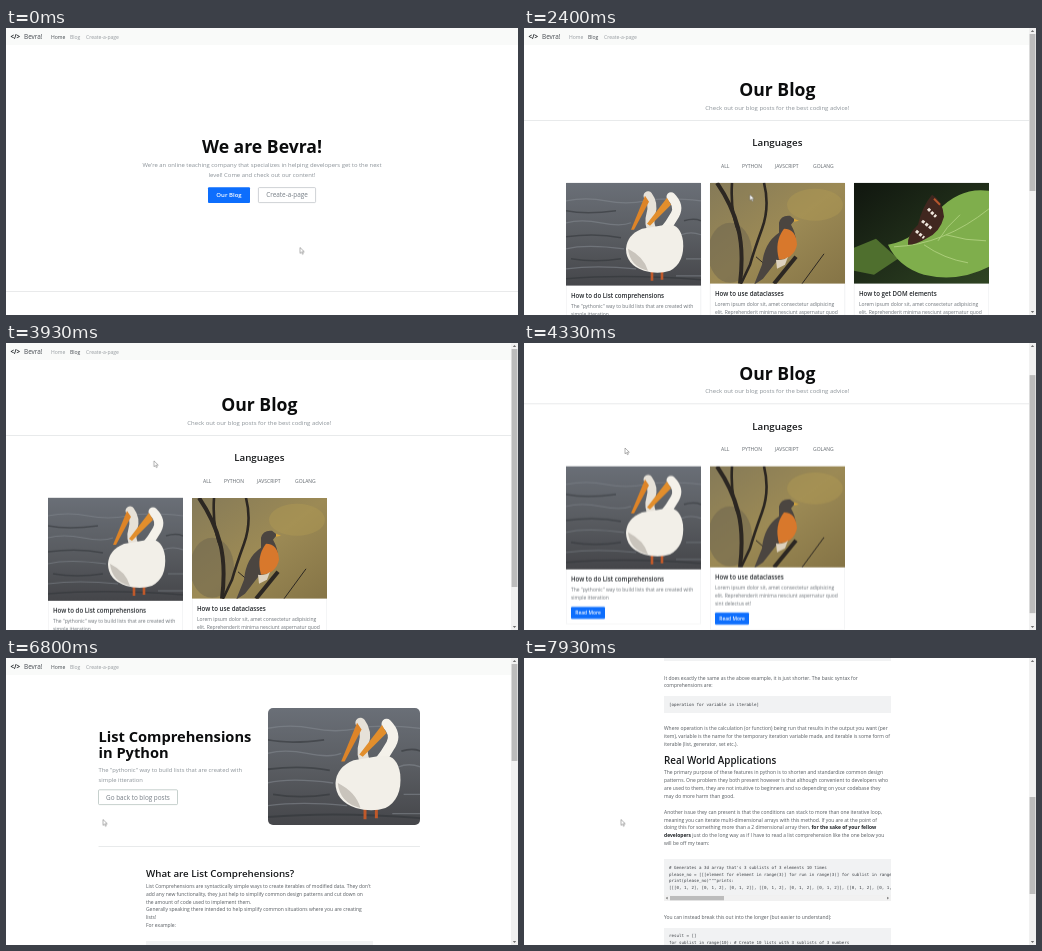
Write an HTML page that moves like this. It is 512 by 287 pixels and loops after 8 s.

```html
<!DOCTYPE html>
<html lang="en">
<head>
<meta charset="utf-8">
<title>Bevra! blog tour</title>
<style>
html, body { margin: 0; width: 100%; height: 100%; overflow: hidden; background: #fff; }
svg#stage { display: block; width: 100%; height: 100%; }
text { font-family: "Open Sans", "Noto Sans", sans-serif; white-space: pre; }
text.code { font-family: "DejaVu Sans Mono", "Noto Sans Mono", monospace; }

.home, .blog, .post, .all, .py, .dots, .hover1, .hover2, .status1, .status2, .hand, .arrow {
  animation: 8s step-end infinite;
}
.home { animation-name: home; }
.blog { animation-name: blog; }
.post { animation-name: post; }
.all { animation-name: all; }
.py { animation-name: py; }
.dots { animation-name: dots; }
.hover1 { animation-name: hover1; }
.hover2 { animation-name: hover2; }
.status1 { animation-name: status1; }
.status2 { animation-name: status2; }
.hand { animation-name: hand; }
.arrow { animation-name: arrow; }
@keyframes home { 0% { opacity: 1 } 11.625%, 100% { opacity: 0 } }
@keyframes blog { 0% { opacity: 0 } 11.625% { opacity: 1 } 70%, 100% { opacity: 0 } }
@keyframes post { 0% { opacity: 0 } 70%, 100% { opacity: 1 } }
@keyframes all { 0% { opacity: 1 } 40.875%, 100% { opacity: 0 } }
@keyframes py { 0% { opacity: 0 } 40.875%, 100% { opacity: 1 } }
@keyframes dots { 0% { opacity: 0 } 40.875% { opacity: 1 } 41.625%, 100% { opacity: 0 } }
@keyframes hover1 { 0% { opacity: 0 } 7% { opacity: 1 } 11.625%, 100% { opacity: 0 } }
@keyframes hover2 { 0% { opacity: 0 } 64% { opacity: 1 } 70%, 100% { opacity: 0 } }
@keyframes status1 { 0% { opacity: 0 } 11.625% { opacity: 1 } 21.625%, 100% { opacity: 0 } }
@keyframes status2 { 0% { opacity: 0 } 70% { opacity: 1 } 75%, 100% { opacity: 0 } }
@keyframes hand {
  0% { opacity: 0 } 7% { opacity: 1 } 21.625% { opacity: 0 } 34.5% { opacity: 1 }
  46.5% { opacity: 0 } 64% { opacity: 1 } 75%, 100% { opacity: 0 }
}
@keyframes arrow {
  0% { opacity: 1 } 7% { opacity: 0 } 21.625% { opacity: 1 } 34.5% { opacity: 0 }
  46.5% { opacity: 1 } 64% { opacity: 0 } 75%, 100% { opacity: 1 }
}

.cursor { animation: cursor 8s linear infinite; }
@keyframes cursor {
  0%, .875% { transform: translate(294px, 219.5px); animation-timing-function: ease-in-out }
  10%, 28.375% { transform: translate(225px, 170px); animation-timing-function: ease-in-out }
  35.875%, 45.5% { transform: translate(233px, 134.5px) }
  49.125% { transform: translate(148.5px, 118px); animation-timing-function: ease-out }
  50.875%, 58.375% { transform: translate(101px, 105px); animation-timing-function: ease-in-out }
  65.5%, 75% { transform: translate(53.5px, 256.5px); animation-timing-function: ease-in-out }
  84.5%, 100% { transform: translate(97px, 161.5px) }
}

.fade { animation: fade 8s linear infinite; }
@keyframes fade {
  0% { opacity: 0 } 40.874% { opacity: 0 }
  40.875%, 41.625% { opacity: 1 }
  44.5%, 100% { opacity: 0 }
}
.shrink { animation: shrink 8s linear infinite; }
@keyframes shrink {
  0%, 41.625% { transform: scale(.87) }
  44.5%, 100% { transform: scale(.4) }
}
.grow1 { animation: grow1 8s linear infinite; }
.grow2 { animation: grow2 8s linear infinite; }
@keyframes grow1 {
  0%, 41.5% { transform: translate(46px, 155px) scale(.02, .8); opacity: 0 }
  45.5%, 100% { transform: translate(42px, 154.8px) scale(1, 1); opacity: 1 }
}
@keyframes grow2 {
  0%, 41.5% { transform: translate(62px, 155px) scale(.02, .8); opacity: 0 }
  45.5%, 100% { transform: translate(186px, 154.8px) scale(1, 1); opacity: 1 }
}

.scroll1 { animation: scroll1 8s linear infinite; }
.thumb1 { animation: thumb1 8s linear infinite; }
.scroll2 { animation: scroll2 8s linear infinite; }
.thumb2 { animation: thumb2 8s linear infinite; }
@keyframes scroll1 {
  0%, 51.25% { transform: translateY(0); animation-timing-function: ease-in-out }
  55.875%, 100% { transform: translateY(-44.6px) }
}
@keyframes thumb1 {
  0%, 51.25% { transform: translateY(0); animation-timing-function: ease-in-out }
  55.875%, 100% { transform: translateY(37px) }
}
@keyframes scroll2 {
  0%, 87% { transform: translateY(0) }
  97.5%, 97.9% { transform: translateY(-360px) }
  99.125%, 100% { transform: translateY(-393px) }
}
@keyframes thumb2 {
  0%, 87% { transform: translateY(0) }
  97.5%, 97.9% { transform: translateY(122px) }
  99.125%, 100% { transform: translateY(133px) }
}
</style>
</head>
<body>
<svg id="stage" viewBox="0 0 512 287">
<defs>
  <linearGradient id="water" x2="0" y2="1"><stop stop-color="#6a6f77"/><stop offset=".5" stop-color="#5a5d62"/><stop offset="1" stop-color="#45464a"/></linearGradient>
  <linearGradient id="scrub" x2="1" y2="1"><stop stop-color="#857a58"/><stop offset=".5" stop-color="#9c8a55"/><stop offset="1" stop-color="#857446"/></linearGradient>
  <linearGradient id="shade" x2="1" y2="1"><stop stop-color="#10160f"/><stop offset="1" stop-color="#2f4423"/></linearGradient>
  <linearGradient id="lawn" x2="1" y2="1"><stop stop-color="#46702b"/><stop offset=".5" stop-color="#6f9a44"/><stop offset="1" stop-color="#54802f"/></linearGradient>
  <clipPath id="round"><rect x="262" y="50" width="152" height="117" rx="5"/></clipPath>
  <clipPath id="pre"><rect x="140" y="0" width="227" height="300"/></clipPath>

  <symbol id="pelican" viewBox="0 0 135 103" preserveAspectRatio="xMidYMid slice">
    <rect width="135" height="103" fill="url(#water)"/>
    <path d="M0 18q20-4 40 0t40 0 55 0M0 40q15-4 35 0t30 0M115 52q10-4 20 0M0 66q20-5 58 0M120 76h15M0 86q30-4 70 0M110 93h25" fill="none" stroke="#858a92" stroke-width="1.2" opacity=".55"/>
    <path d="M0 28q20 4 50 0M0 54q30-4 55 1M118 38q10-3 17 0M5 76q24 4 50 0M0 96q60-5 135 1" fill="none" stroke="#303337" stroke-width="1.6" opacity=".55"/>
    <path d="M86 87v11m10-11v10" stroke="#c0592a" stroke-width="2.6"/>
    <g fill="none" stroke-linecap="round">
      <path d="M82 13q6 8 3 18t2 18" stroke="#e6e1d8" stroke-width="9"/>
      <path d="M105 14q9 9 4 18T98 48" stroke="#f4f1ea" stroke-width="9"/>
    </g>
    <path d="M60 66q1-14 16-20l24-4q14-2 17 16 2 22-13 30-12 4-26 0-18-6-18-22z" fill="#f2efe8"/>
    <path d="M62 66q16 8 20 22-18-4-20-22z" fill="#c9c4bc"/>
    <path d="M79 13l4 6-15 28-3 0z" fill="#dd8428"/>
    <path d="M101 15l4 7-21 21-3-2z" fill="#e28e2c"/>
  </symbol>

  <symbol id="robin" viewBox="0 0 135 101" preserveAspectRatio="xMidYMid slice">
    <rect width="135" height="101" fill="url(#scrub)"/>
    <ellipse cx="105" cy="22" rx="28" ry="16" fill="#b09a52" opacity=".45"/>
    <ellipse cx="20" cy="70" rx="22" ry="30" fill="#6d654f" opacity=".5"/>
    <g fill="none" stroke="#2c2722">
      <path d="M7 0q15 22 21 45t2 56" stroke-width="4"/>
      <path d="M30 52q-10-20-8-52M54 0q6 24-2 46T40 82l-9 19" stroke-width="2.6"/>
      <path d="M86 74L64 101" stroke-width="4"/>
      <path d="M60 86l-14-12M92 101l22-30" stroke-width="1"/>
    </g>
    <path d="M69 40q2-8 11-7l5 4-4 5q7 12 4 24-6 10-18 12l-14 18-9 6 8-20q2-22 17-32z" fill="#4b4540"/>
    <path d="M74 46q12 0 13 16-3 14-18 15-5-18 5-31z" fill="#d8782c"/>
    <path d="M66 77q8 1 12-3l-3 8-8 4z" fill="#ddd2bf"/>
    <path d="M84 36l5 2-5 1z" fill="#d8a53a"/>
  </symbol>

  <symbol id="admiral" viewBox="0 0 135 101" preserveAspectRatio="xMidYMid slice">
    <rect width="135" height="101" fill="url(#shade)"/>
    <path d="M0 65L22 56 44 76 20 92 0 88z" fill="#4f6f2e"/>
    <path d="M34 62Q60 58 84 28 106 4 135 8V84Q104 100 70 92 44 84 34 62z" fill="#7fae4c"/>
    <path d="M40 64Q90 62 135 26M70 62q20 14 44 18M92 52q20 6 40 6M84 58q8-14 22-26" fill="none" stroke="#abcd7a" stroke-width="1"/>
    <path d="M78 12q11 6 12 22-4 16-18 22-10 6-18 6-1-10 10-20 4-18 14-30z" fill="#40271f"/>
    <path d="M74 26l8 8M68 38l10 8M62 48l8 7" stroke="#ece4da" stroke-width="3" stroke-dasharray="3 1.5"/>
    <path d="M80 16l6 6" stroke="#b5562d" stroke-width="2"/>
  </symbol>

  <symbol id="moth" viewBox="0 0 135 101" preserveAspectRatio="xMidYMid slice">
    <rect width="135" height="101" fill="url(#lawn)"/>
    <g fill="#8e4550">
      <path d="M10 42q20-12 32 6-18 10-32-6zM22 80q12-22 36-16-8 24-36 16zM88 72q18-12 30 8-18 12-30-8zM92 26q10-18 28-10-6 18-28 10zM60 88q14-12 26 4-14 10-26-4z"/>
    </g>
    <path d="M12 101Q50 66 84 64T132 30" fill="none" stroke="#703a40" stroke-width="2"/>
    <path d="M104 44q12-12 24 0-10 12-24 0zM2 20q14-8 24 2-12 10-24-2z" fill="#a9655f"/>
    <path d="M68 52Q54 34 42 38q4 18 20 22l6 4 6-4q18-6 16-22-14-2-22 14z" fill="#2b201f"/>
    <path d="M48 44l16 12 8 0 14-12" fill="none" stroke="#efe7da" stroke-width="2.4" stroke-dasharray="4 1.2"/>
  </symbol>

  <symbol id="frog" viewBox="0 0 135 101" preserveAspectRatio="xMidYMid slice">
    <rect width="135" height="101" fill="url(#lawn)"/>
    <path d="M0 30L135 8M0 70L135 40M10 101L135 74" stroke="#87ae58" stroke-width="5" opacity=".5"/>
    <path d="M0 0h50L0 26zM135 101H90l45-24z" fill="#345a22" opacity=".7"/>
    <path d="M64 56q10-6 20 0 6 6 2 12l-14 4q-10-6-8-16z" fill="#c0d184"/>
    <path d="M66 60l-6 10m24-12l8 8M74 58l8 8" stroke="#24381a" stroke-width="2.2"/>
  </symbol>
</defs>
</svg>
<script>
const GRAY = '#8b9298', INK = '#212529', BODY = '#555a5f', BLUE = '#0d6efd', DARK = '#0b55c4';
const esc = s => s.replace(/&/g, '&amp;').replace(/</g, '&lt;');
const text = (x, y, size, s, fill = INK, more = '') =>
  `<text x="${x}" y="${y}" font-size="${size}" fill="${fill}" ${more}>${esc(s)}</text>`;
const mid = (x, y, size, s, fill, more = '') => text(x, y, size, s, fill, 'text-anchor="middle" ' + more);
const rect = (x, y, w, h, fill, more = '') =>
  `<rect x="${x}" y="${y}" width="${w}" height="${h}" fill="${fill}" ${more}/>`;
const g = (cls, body) => `<g class="${cls}">${body}</g>`;
const at = (x, y, body) => `<g transform="translate(${x} ${y})">${body}</g>`;
const lines = (x, y, step, size, list, fill = BODY, more = '') =>
  list.map((s, i) => text(x, y + i * step, size, s, fill, more)).join('');
const para = (y, list) => lines(140, y, 7.8, 4.97, list);
const code = (y, list) => lines(145, y, 6.9, 4.18, list, '#3d4146', 'class="code"');
const block = (y, h) => rect(140, y, 227, h, '#f1f2f3');
const bold = 'font-weight="700"', semi = 'font-weight="600"';

function nav(active, width) {
  const items = [['Home', 45], ['Blog', 64], ['Create-a-page', 80]];
  return rect(0, 0, width, 17, '#f9faf9') +
    text(4.5, 11.4, 6.2, '</>', INK, bold) + text(18, 11.4, 6.4, 'Bevra!', '#454a50') +
    items.map(([s, x]) => text(x, 11.2, 5.05, s, s === active ? '#454a50' : '#969ba0')).join('');
}

const track = thumb => rect(505, 0, 7, 287, '#f1f1f1') +
  '<path d="M506.8 4l1.7-2 1.7 2zM506.8 283l1.7 2 1.7-2z" fill="#707070"/>' + thumb;
const thumb = (cls, h) => rect(505.6, 6, 5.8, h, '#bcbcbc', `class="${cls}"`);

const status = (cls, w, page) => g(cls, rect(0, 280, w, 7, '#000') +
  text(1.5, 285.2, 3.7, 'file:///C:/Users/sampleuser1/Desktop/day 4 exercises/bevra/' + page, '#fff', semi));

function card(pic, w, h, title, body, hover = '') {
  const last = h + 22 + (body.length - 1) * 7.8, top = last + 7.6;
  const button = (fill, cls) => rect(5, top, 34, 12, fill, `rx="1" class="${cls}"`);
  return rect(.25, .25, w - .5, top + 17, '#fff', 'rx="1" stroke="#e2e4e6" stroke-width=".5"') +
    `<use href="#${pic}" width="${w}" height="${h}"/>` +
    text(5, h + 12, 6.15, title, INK, semi) +
    lines(5, h + 22, 7.8, 4.97, body, '#6d7379') +
    button(BLUE, '') + (hover && button(DARK, hover)) +
    mid(22, top + 7.9, 4.9, 'Read More', '#fff', semi);
}

const lorem = ['Lorem ipsum dolor sit, amet consectetur adipisicing',
  'elit. Reprehenderit minima nesciunt aspernatur quod', 'sint delectus et!'];
const narrow = ['Lorem ipsum dolor sit, amet consectetur',
  'adipisicing elit. Reprehenderit minima nesciunt', 'aspernatur quod sint delectus et!'];
const intro = ['The "pythonic" way to build lists that are created with', 'simple itteration'];
const listCard = hover => card('pelican', 135, 103, 'How to do List comprehensions', intro, hover);
const dataCard = card('robin', 135, 101, 'How to use dataclasses', lorem);
const small = (x, pic, title) => at(x, 164, g('shrink', card(pic, 122, 91, title, narrow)));

const home = nav('Home', 512) +
  mid(256, 125.3, 17.6, 'We are Bevra!', '#0b0c0d', bold) +
  mid(256, 139.2, 5.9, "We're an online teaching company that specializes in helping developers get to the next", GRAY) +
  mid(256, 149, 5.9, 'level! Come and check out our content!', GRAY) +
  rect(202, 159.3, 42, 15.6, BLUE, 'rx="1"') + rect(202, 159.3, 42, 15.6, DARK, 'rx="1" class="hover1"') +
  mid(223, 169.4, 6, 'Our Blog', '#fff', semi) +
  rect(252.4, 159.6, 57.2, 15, '#fff', 'rx="1" stroke="#adb3b9" stroke-width=".6"') +
  mid(281, 169.4, 6.4, 'Create-a-page', '#757d85') +
  rect(0, 263, 512, .8, '#e4e5e6');

const blogPage = nav('Blog', 505) +
  mid(253.3, 68, 17.6, 'Our Blog', '#0b0c0d', bold) +
  mid(253.3, 81.6, 5.97, 'Check out our blog posts for the best coding advice!', GRAY) +
  rect(0, 92, 505, .7, '#dfe1e3') +
  mid(253.3, 118.3, 9.75, 'Languages', '#16181a', semi) +
  [['ALL', 197], ['PYTHON', 218], ['JAVSCRIPT', 251], ['GOLANG', 289]]
    .map(([s, x]) => text(x, 139.8, 5, s, '#5f656b')).join('') +
  g('all', at(42, 154.8, listCard()) + at(186, 154.8, dataCard) +
    at(330, 154.8, card('admiral', 135, 101, 'How to get DOM elements', lorem))) +
  g('fade', small(81, 'admiral', 'How to get DOM elements') +
    small(208, 'moth', 'The many equals signs of JS') + small(336, 'frog', 'golang')) +
  g('dots', '<path d="M46.5 155v132M62 155v132" stroke="#dbe3ee" stroke-width=".7" stroke-dasharray="1 3"/>' +
    rect(45.8, 233, 2.4, 2, BLUE) + rect(61.5, 266, 2.4, 2, BLUE)) +
  g('py', g('grow1', listCard('hover2')) + g('grow2', dataCard));

const blog = g('scroll1', blogPage) +
  track(g('all', thumb('', 157)) + g('py', thumb('thumb1', 238))) +
  status('status1', 128, 'blog.html');

const opening = nav('Home', 505) +
  lines(92.5, 84, 16, 14.65, ['List Comprehensions', 'in Python'], '#0b0c0d', bold) +
  lines(92.5, 114, 9.8, 5.82, intro, GRAY) +
  rect(92.5, 131.8, 79, 14.8, '#fff', 'rx="1" stroke="#9fb0ac" stroke-width=".6"') +
  mid(132, 141.6, 6.37, 'Go back to blog posts', '#757d85') +
  '<g clip-path="url(#round)"><use href="#pelican" x="262" y="50" width="152" height="117"/></g>' +
  rect(92.5, 188, 321.5, .7, '#dfe1e3') +
  text(140, 219.4, 9.75, 'What are List Comprehensions?', '#16181a', semi) +
  para(230, [
    "List Comprehensions are syntactically simple ways to create iterables of modified data. They don't",
    'add any new functionality, they just help to simplify common design patterns and cut down on',
    'the amount of code used to implement them.',
    'Generally speaking there intended to help simplify common situations where you are creating',
    'lists!', 'For example:']) +
  block(283, 40) + code(293, ['result = []', 'for number in range(10):', '    result.append(number)', 'print(result)']) +
  para(341, ['Can be written as:']) +
  block(356, 40) + code(370, ['result = [number for number in range(10)]', 'print(result)']);

const closing =
  para(21.6, [
    'It does exactly the same as the above example, it is just shorter. The basic syntax for', 'comprehensions are:']) +
  block(38, 17) + code(47.6, ['[operation for variable in iterable]']) +
  para(72.2, [
    'Where operation is the calculation (or function) being run that results in the output you want (per',
    'item), variable is the name for the temporary iteration variable made, and iterable is some form of',
    'iterable (list, generator, set etc.).']) +
  text(140, 105.6, 9.85, 'Real World Applications', '#16181a', semi) +
  para(116.2, [
    'The primary purpose of these features in python is to shorten and standardize common design',
    'patterns. One problem they both present however is that although convenient to developers who',
    'are used to them, they are not intuitive to beginners and so depending on your codebase they',
    'may do more harm than good.']) +
  para(155.7, [
    'Another issue they can present is that the conditions can stack to more than one iterative loop,',
    'meaning you can iterate multi-dimensional arrays with this method. If you are at the point of']) +
  `<g font-size="4.97" fill="${BODY}"><text x="140" y="171.3">doing this for something more than a 2 dimensional array then, <tspan ${bold} fill="${INK}">for the sake of your fellow</tspan></text>` +
  `<text x="140" y="179.1"><tspan ${bold} fill="${INK}">developers</tspan> just do the long way as if I have to read a list comprehension like the one below you</text></g>` +
  para(186.9, ['will be off my team:']) +
  block(201, 42) +
  '<g clip-path="url(#pre)">' + code(210.6, [
    "# Generates a 3d array that's 3 sublists of 3 elements 10 times",
    'please_no = [[[element for element in range(3)] for run in range(3)] for sublist in range(10)]',
    'print(please_no)"""prints:',
    '[[[0, 1, 2], [0, 1, 2], [0, 1, 2]], [[0, 1, 2], [0, 1, 2], [0, 1, 2]], [[0, 1, 2], [0, 1, 2],']) + '</g>' +
  rect(140, 237.2, 227, 5.8, '#f1f1f1') + rect(146, 238, 54, 4.3, '#bcbcbc') +
  '<path d="M143.6 238.7l-1.8 1.4 1.8 1.4zM363.2 238.7l1.8 1.4-1.8 1.4z" fill="#707070"/>' +
  para(260.8, ['You can instead break this out into the longer (but easier to understand):']) +
  block(270, 60) + code(279.4, ['result = []',
    'for sublist in range(10): # Create 10 lists with 3 sublists of 3 numbers']);

const post = g('scroll2', opening + at(0, 393, closing)) + track(thumb('thumb2', 97)) +
  status('status2', 165, 'posts/python/list-comprehensions.html');

const cursor = g('cursor',
  '<path class="arrow" d="M0 0v5.8l1.4-1.2 1 2.1 1-.5-1-2h1.9z" fill="#fff" stroke="#666" stroke-width=".5"/>' +
  '<path class="hand" d="M-.6.6q.6-1 1.2 0v2.2l3 .7q.7.3.6 1.2l-.5 2.6H.2L-1.7 4.7q-.2-.9.6-.7l.5.5z" fill="#fff" stroke="#333" stroke-width=".5"/>');

document.getElementById('stage').insertAdjacentHTML('beforeend',
  rect(0, 0, 512, 287, '#fff') + g('home', home) + g('blog', blog) + g('post', post) + cursor);
</script>
</body>
</html>
```
